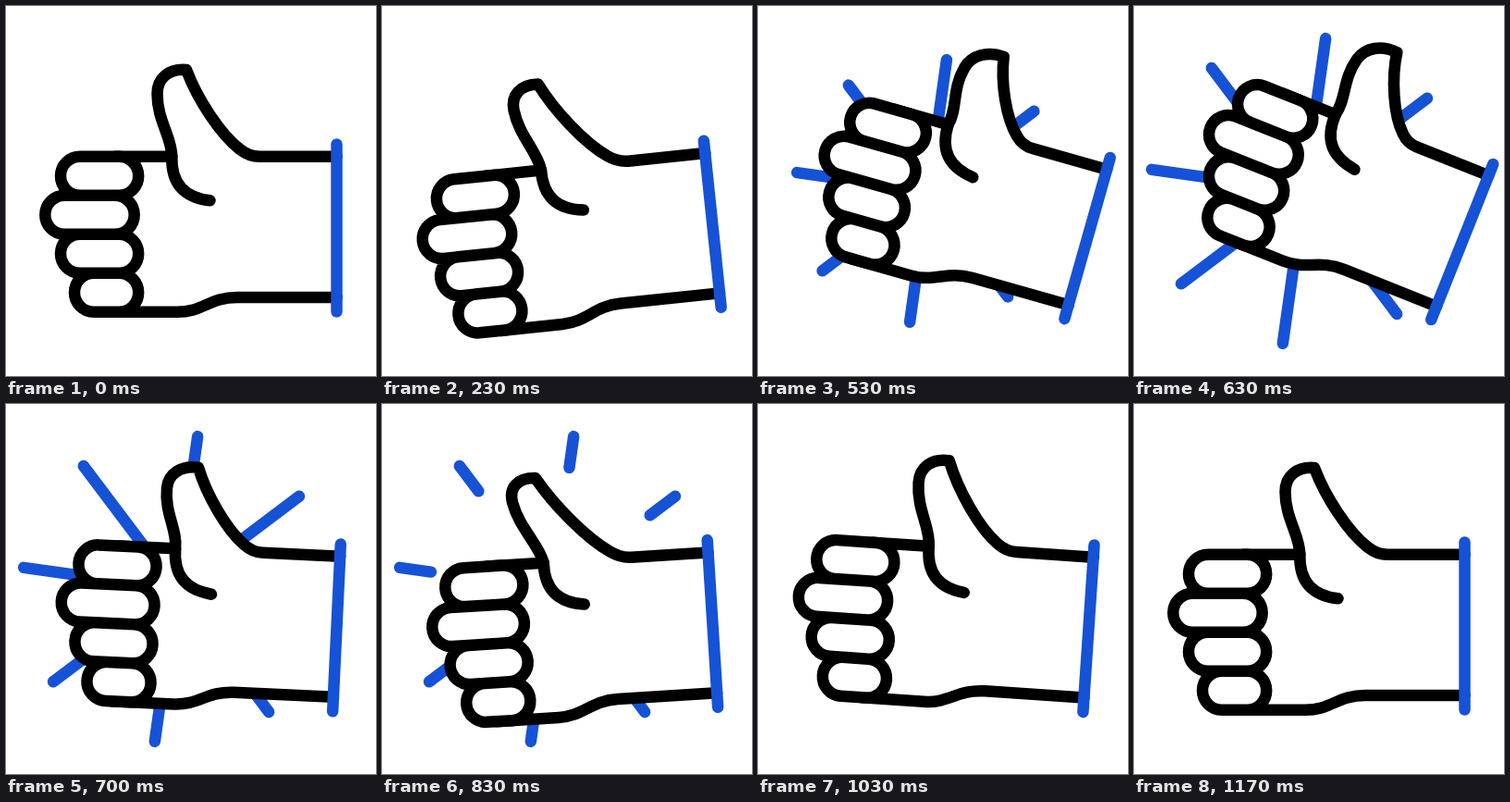
An HTML page with a canvas that plays this animation: 400 by 400 pixels, repeating every 1670 ms.

```html
<!DOCTYPE html>
<html lang="en">
<head>
<meta charset="utf-8">
<title>Thumbs up</title>
<style>
  html, body { margin: 0; width: 100%; height: 100%; overflow: hidden; background: #fff; }
  canvas { display: block; width: 400px; height: 400px; }
</style>
</head>
<body>
<canvas id="stage"></canvas>
<script>
const SIZE = 400, LOOP = 1670, DELAY = 100, STEP = 100 / 3, LAST = 32;
const BLACK = '#000', BLUE = '#1652d6', WHITE = '#fff', LINE = 12.5;
const TOP = 162.8, FINGER = 42, BOTTOM = TOP + 4 * FINGER, KNUCKLE = 143.2, CUFF = 357.5;
const CLENCH = 16.5;

const canvas = document.getElementById('stage');
const ctx = canvas.getContext('2d');
const dpr = window.devicePixelRatio || 1;
canvas.width = canvas.height = SIZE * dpr;

// Larger powers give a sharper ease in and out
function ease(u, power) {
  const a = u ** power, b = (1 - u) ** power;
  return a / (a + b);
}

// Keys are [step, value, power of the ease leading to the key]
function track(n, ...keys) {
  if (n <= keys[0][0]) return keys[0][1];
  for (let i = 1; i < keys.length; i++) {
    const [n0, v0] = keys[i - 1], [n1, v1, power = 1.6] = keys[i];
    if (n <= n1) return v0 + (v1 - v0) * ease((n - n0) / (n1 - n0), power);
  }
  return keys[keys.length - 1][1];
}

const tilt = n => track(n, [0, 0], [8, -11.9], [15, 23.5, 1.4], [20, -6.5, 2], [26, 5.1], [32, 0]);
const bend = n => track(n, [0, 0], [8, -1], [14.4, 1.28, 2.4], [22, -1, 2], [28, 0]);

// Each finger closes one step after the one above; all open together
const clench = (n, i) => track(n, [2 + i, 0], [8 + i, 1, 1.4], [20, 1], [26, 0]);

function stroke(color) {
  ctx.strokeStyle = color;
  ctx.stroke();
}

function fill() {
  ctx.fillStyle = WHITE;
  ctx.fill();
}

function drawRays(n) {
  const outer = 166.5 * track(n, [6, 0], [15, 1, 1.45]);
  const inner = 166.5 * track(n, [15, 0], [25, 1]);
  if (outer - inner < 0.01) return;
  ctx.beginPath();
  for (let i = 0; i < 8; i++) {
    const a = (8 + 45 * i) * Math.PI / 180, c = Math.cos(a), s = Math.sin(a);
    ctx.moveTo(184 + inner * c, 200 + inner * s);
    ctx.lineTo(184 + outer * c, 200 + outer * s);
  }
  stroke(BLUE);
}

function drawPalm(n) {
  const b = bend(n), drop = clench(n, 0) * (4.5 + 2 * b);

  // The thumb leans by a shear that grows with height above the palm
  const lean = (x, y) => {
    const h = Math.max(0, TOP - y);
    return [x + 0.2 * b * h, y + drop * (h / 94) ** 2];
  };
  const curve = (x1, y1, x2, y2, x, y) =>
    ctx.bezierCurveTo(...lean(x1, y1), ...lean(x2, y2), ...lean(x, y));

  ctx.beginPath();
  ctx.moveTo(CUFF, TOP);
  ctx.lineTo(274, TOP);
  curve(266, TOP, 260, 160.5, 253, 155);
  curve(232, 139, 207, 101, 195, 69);
  curve(176, 67.5, 163.5, 78, 163.5, 95);
  curve(163.5, 124, 179.5, 142, 179.3, TOP);
  // The left side stays hidden below the fingers
  ctx.lineTo(118, TOP);
  ctx.lineTo(118, BOTTOM);
  ctx.lineTo(185, BOTTOM);
  ctx.bezierCurveTo(213, BOTTOM, 220, 315, 250, 315);
  ctx.lineTo(CUFF, 315);
  fill();
  stroke(BLACK);

  ctx.beginPath();
  ctx.moveTo(179.3, TOP);
  ctx.bezierCurveTo(178.5, 193, 194, 207, 220.5, 210.3);
  stroke(BLACK);
}

function drawFingers(n) {
  ctx.beginPath();
  [59, 42.3, 59, 74].forEach((left, i) => {
    const c = clench(n, i), right = i === 1 ? KNUCKLE - 4.5 * (1 - c) : KNUCKLE;
    ctx.roundRect(left + CLENCH * c, TOP + i * FINGER, right - left, FINGER, FINGER / 2);
  });
  fill();
  stroke(BLACK);
}

function drawCuff() {
  ctx.beginPath();
  ctx.moveTo(CUFF, 149.5);
  ctx.lineTo(CUFF, 330.5);
  stroke(BLUE);
}

function draw(time) {
  // The motion advances in whole steps, thirty a second
  const step = Math.floor((time % LOOP - DELAY + 4) / STEP);
  const n = Math.max(0, Math.min(LAST, step));
  ctx.setTransform(dpr, 0, 0, dpr, 0, 0);
  ctx.fillStyle = WHITE;
  ctx.fillRect(0, 0, SIZE, SIZE);
  ctx.lineWidth = LINE;
  ctx.lineCap = ctx.lineJoin = 'round';

  drawRays(n);
  ctx.translate(317, 240.3);
  ctx.rotate(tilt(n) * Math.PI / 180);
  ctx.translate(-317, -240.3);
  drawPalm(n);
  drawFingers(n);
  drawCuff();
}

const start = performance.now();
function tick() {
  draw(performance.now() - start);
  requestAnimationFrame(tick);
}
tick();
</script>
</body>
</html>
```
